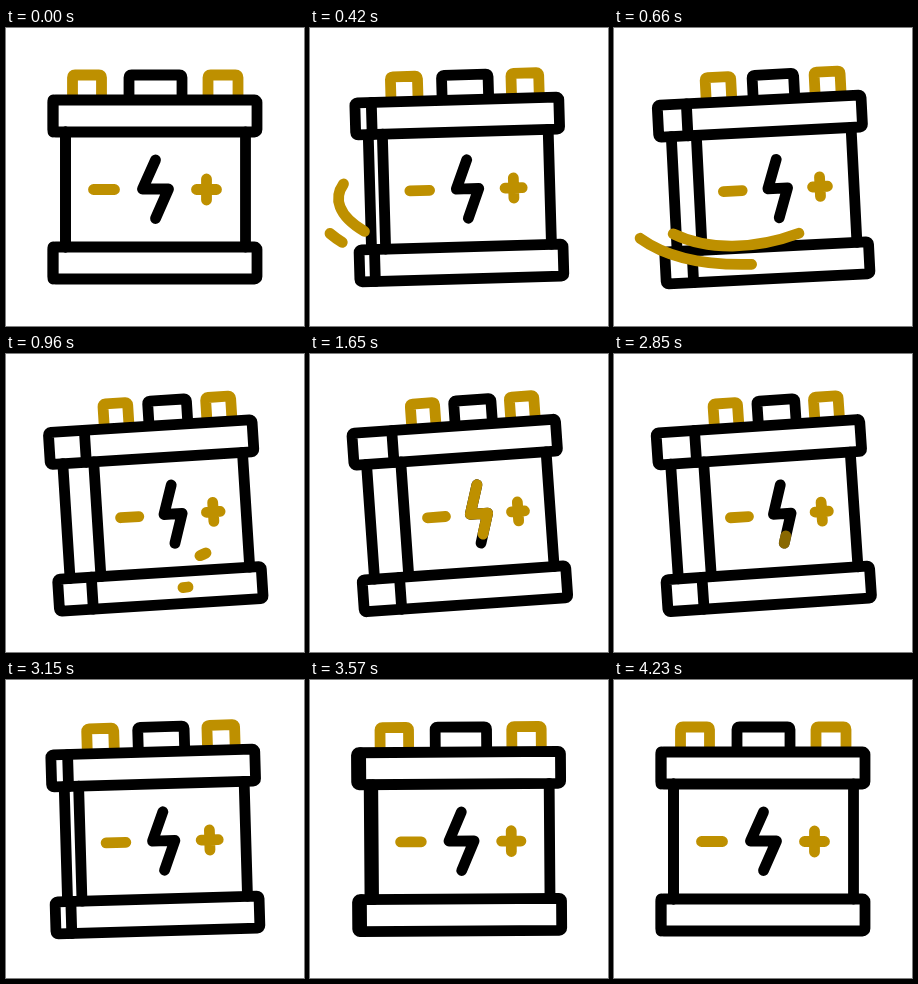
Animation of 298x298 px, one loop 4.53 s. Source, as an HTML page:

```html
<!DOCTYPE html>
<html lang="en">
<head>
<meta charset="utf-8">
<title>Battery</title>
<style>
  html, body { margin: 0; width: 100%; height: 100%; overflow: hidden; background: #fff; }
  svg { display: block; width: 100%; height: 100%; }
  path, rect { fill: none; stroke: #000; stroke-width: 10.8; stroke-linecap: round; stroke-linejoin: round; }
  .gold { stroke: #be9000; }
  .flat { stroke-linecap: butt; }
</style>
</head>
<body>
<svg viewBox="0 0 298 298">
  <g id="battery">
    <path class="gold flat" id="poles"/>
    <path class="flat" id="vent"/>
    <rect x="47" y="72" width="204" height="32" rx="2.5"/>
    <rect x="47" y="219" width="204" height="32" rx="2.5"/>
    <path d="M59.5 104V219M239.5 104V219"/>
    <path id="side"/>
    <path class="gold" id="signs"/>
    <path id="bolt"/>
    <path class="gold" id="charge" pathLength="1"/>
  </g>
  <path class="gold" id="swooshA" pathLength="1" d="M33.500 156C23.500 170 27.500 188 55.500 204C95 225 150 222 200 199"/>
  <path class="gold" id="swooshB" pathLength="1" d="M20 205.500C60 239 120 240 182 233"/>
</svg>
<script>
const LOOP = 4530, STEP = 30;
const $ = id => document.getElementById(id);
const mix = (a, b, p) => a + (b - a) * p;

function bezier(x1, x2) {
  return u => {
    if (u <= 0) return 0;
    if (u >= 1) return 1;
    let lo = 0, hi = 1, s;
    for (let i = 0; i < 24; i++) {
      s = (lo + hi) / 2;
      const x = 3 * x1 * s * (1 - s) ** 2 + 3 * x2 * s * s * (1 - s) + s ** 3;
      if (x < u) lo = s; else hi = s;
    }
    return s * s * (3 - 2 * s);
  };
}
const swing = bezier(.25, .05), smooth = bezier(.33, .67);
const span = (t, from, to, ease = smooth) => ease((t - from) / (to - from));

// Show only the part of a path between two fractions of its length
function trim(id, start, end) {
  const el = $(id), len = end - start;
  el.style.display = len > .0005 ? "" : "none";
  el.style.strokeDasharray = `${len} 2`;
  el.style.strokeDashoffset = -start;
}

const draw = (id, d) => $(id).setAttribute("d", d);
const arch = (l, r) => `M${l} 72V49.500q0 -2.500 2.500 -2.500H${r - 2.5}q2.500 0 2.500 2.500V72`;

function pose(p) {
  const at = (a, b) => mix(a, b, p);
  $("battery").setAttribute("transform", `rotate(${-4 * p} 149.5 149.5)`);
  draw("poles", arch(at(66.5, 107.2), at(95.5, 131.5)) + arch(at(202, 206.5), at(232, 231)));
  draw("vent", arch(at(123, 150.7), at(176, 188)));

  const top = at(47, 87), base = at(47, 84.5), body = at(59.5, 93.8);
  draw("side", `M${top} 72V104M${base} 219V251M${body} 104V219`);

  const mx = at(98, 125.6), mw = at(10.5, 9);
  const px = at(200.5, 207.3), pw = at(10, 6.5), ph = at(10.5, 9.5);
  draw("signs", `M${mx - mw} 161.5H${mx + mw}M${px - pw} 161.5H${px + pw}M${px} ${161.5 - ph}V${161.5 + ph}`);

  const bx = at(149.5, 168.2), bw = at(13, 8.7);
  const bolt = `M${bx} 132L${bx - bw} 161H${bx + bw}L${bx} 190.5`;
  draw("bolt", bolt);
  draw("charge", bolt);
}

function render(time) {
  const t = Math.floor((time % LOOP) / STEP) * STEP;
  pose(span(t, 112, 1612, swing) - span(t, 2745, 4230, swing));
  trim("charge", span(t, 1950, 3060), span(t, 1020, 1820));
  $("charge").style.opacity = 1 - span(t, 2760, 3020);
  trim("swooshA", span(t, 450, 1020), span(t, 245, 745));
  trim("swooshB", span(t, 610, 1000), span(t, 328, 828));
}

const begin = performance.now();
function tick() {
  render(performance.now() - begin);
  requestAnimationFrame(tick);
}
tick();
</script>
</body>
</html>
```
